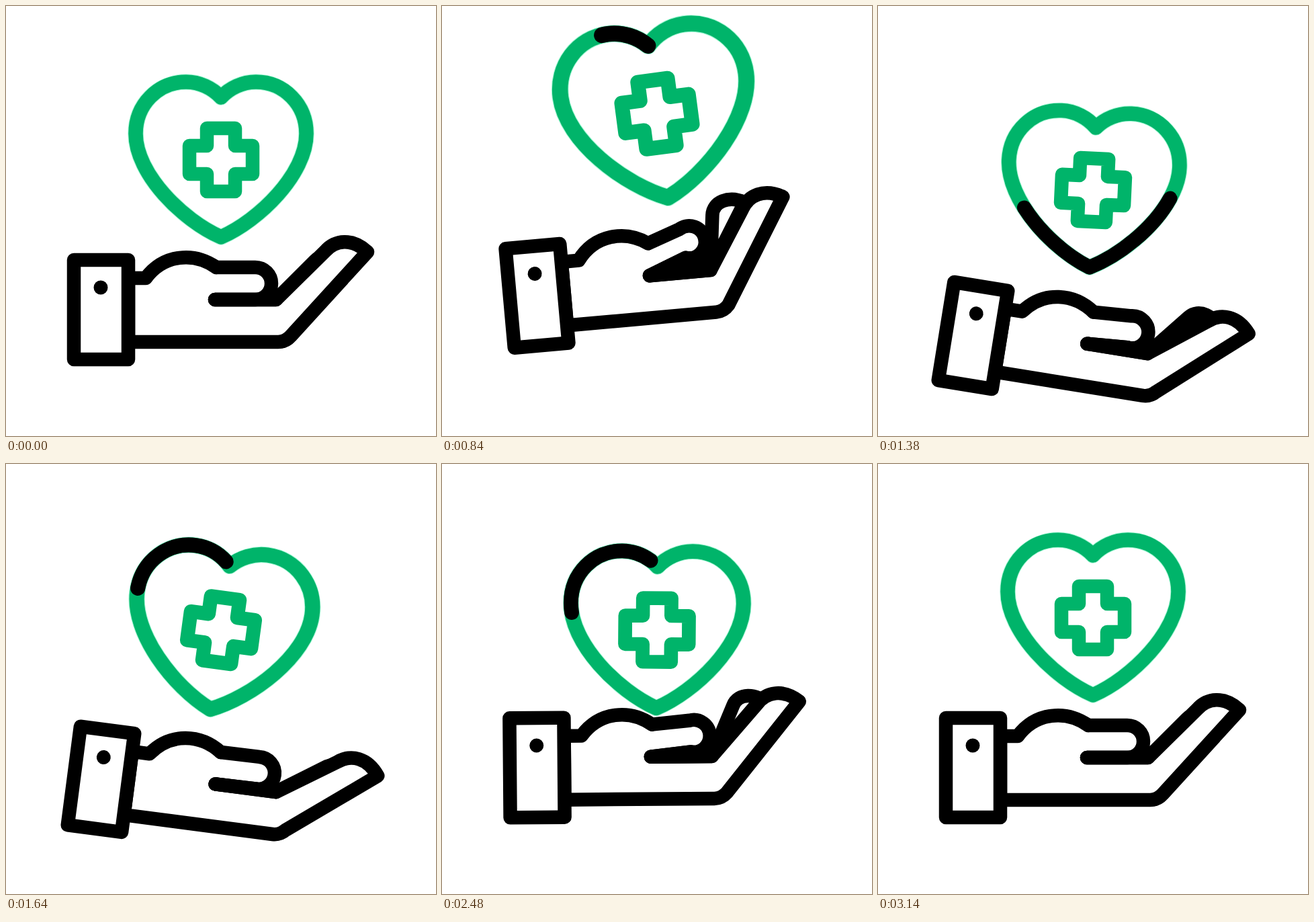
An HTML page for the animation above (3600 ms loop, 640 px wide and 640 px high).

```html
<!DOCTYPE html>
<html lang="en">
<head>
<meta charset="utf-8">
<title>Caring hand</title>
<style>
  html, body { margin: 0; height: 100%; overflow: hidden; background: #fff; }
  svg { display: block; width: 100vw; height: 100vh; }
  path { fill: none; stroke-width: 20.5; stroke-linejoin: round; stroke-linecap: round; }
  #hand path { stroke: #000; }
  #hand .solid { fill: #fff; }
  #heart path { stroke-width: 21.5; }
  .green { stroke: #00b46a; }
  #heart .rim { stroke: #a4f7d4; stroke-width: 23.5; }
  .dash { stroke: #000; }
</style>
</head>
<body>
<svg viewBox="0 0 640 640">
  <g id="hand">
    <path id="back" class="solid"/>
    <path id="palm" class="solid"/>
    <path id="thumb"/>
    <path id="wedge" style="fill:#000"/>
    <path class="solid" d="M101 378H182V526H101Z"/>
    <circle cx="141" cy="419" r="10.5"/>
  </g>
  <g id="heart"></g>
  <g id="cross"></g>
</svg>
<script>
const LOOP = 3600, END = 3140;
const HEART = 'M320 136C333 122 352 113 372 113C414 113 447 147 447 190C447 250 377 319 320 344' +
  'C263 319 193 250 193 190C193 147 226 113 268 113C288 113 307 122 320 136Z';
const CROSS = 'M299 182H341V208H367V250H341V276H299V250H273V208H299Z';

// Turning points of the toss: rest, up, down, up, settle, rest
const TOSS = [150, 750, 1420, 2010, 2520, END];
const TILT = [0, 600, 1050, 1600, 2020, 2500, END];
// Middle of each black sweep round the heart, its length, and how far its ends lie apart
const SWEEPS = [490, 1390, 2245], SWEEP = 806, LAG = 100;

const $ = id => document.getElementById(id);
const setPath = (id, d) => $(id).setAttribute('d', d);

function addPath(parent, d, cls) {
  const p = document.createElementNS('http://www.w3.org/2000/svg', 'path');
  p.setAttribute('d', d);
  p.setAttribute('class', cls);
  p.setAttribute('pathLength', 1);
  return $(parent).appendChild(p);
}
addPath('heart', HEART, 'rim');
addPath('heart', HEART, 'green');
addPath('cross', CROSS, 'green');
const dashes = SWEEPS.map(() => addPath('heart', HEART, 'dash'));

const ease = u => (1 - Math.cos(Math.PI * Math.min(1, Math.max(0, u)))) / 2;

// Starts and ends at 0, easing through one peak per inner beat
function swing(t, peaks, beats = TOSS) {
  const stops = [0, ...peaks, 0];
  return stops.slice(1).reduce((v, stop, i) =>
    v + (stop - stops[i]) * ease((t - beats[i]) / (beats[i + 1] - beats[i])), 0);
}

function spin(x, y, deg, cx, cy) {
  const a = deg * Math.PI / 180, c = Math.cos(a), s = Math.sin(a);
  x -= cx;
  y -= cy;
  return `${(cx + x * c - y * s).toFixed(2)} ${(cy + x * s + y * c).toFixed(2)} `;
}

function drawHand(t) {
  // The arm leads the toss; wrist and fingers trail behind it
  const y = swing(t + 40, [-26.5, 38.5, -13.5, 0]);
  const turn = swing(t - 60, [-5.2, 10, -5, 0]);
  const bend = swing(t - 150, [-13, 12, -13.5, 0]);
  const thumb = swing(t - 150, [-18, 0, -17.5, 0]);
  const curl = bend + swing(t - 260, [-31, 0, -28, 0]);

  const front = (x, y) => spin(x, y, bend, 402, 437);
  const back = (x, y) => spin(x, y, curl, 402, 437);
  const low = spin(371, 437, thumb * 1.2, 311, 437);

  $('hand').setAttribute('transform', `translate(0 ${y}) rotate(${turn} 141.5 452)`);
  setPath('back', `M402 437L${back(460, 379)}C${back(474, 365)}${back(498, 374)}${back(508, 398)}Z`);
  setPath('palm', `M311 437H402L${front(475, 365)}C${front(490, 348)}${front(515, 345)}${front(538, 366)}` +
    'L424 491Q416 500 405 500H182V405H208C235 369 280 366 313 389');
  setPath('thumb', `M313 389L${spin(371, 389, thumb, 312, 413)}A24 24 0 1 1 ${low}L311 437`);
  setPath('wedge', `M311 437L${low}L402 437Z`);
}

function drawHeart(t) {
  const y = 229 + swing(t, [-74, 46, -45, 19]);
  const tilt = swing(t, [-7.5, -7.5, 8, -5.2, .5], TILT);
  const grow = swing(t, [.1, 0, .11, .01]);
  const place = size => `translate(320 ${y}) rotate(${tilt}) scale(${size}) translate(-320 -229)`;
  $('heart').setAttribute('transform', place(1 + grow));
  $('cross').setAttribute('transform', place(1 + grow * .7));

  dashes.forEach((dash, i) => {
    const progress = shift => ease((t - SWEEPS[i] + shift) / SWEEP + .5);
    const from = progress(-LAG), length = progress(LAG) - from;
    dash.style.display = length > .003 ? '' : 'none';
    dash.setAttribute('stroke-dasharray', `${length} 2`);
    dash.setAttribute('stroke-dashoffset', -from);
  });
}

const began = performance.now();
function tick() {
  const elapsed = (performance.now() - began) % LOOP;
  const t = Math.min(END, Math.floor(elapsed / 20) * 20);
  drawHand(t);
  drawHeart(t);
  requestAnimationFrame(tick);
}
tick();
</script>
</body>
</html>
```
